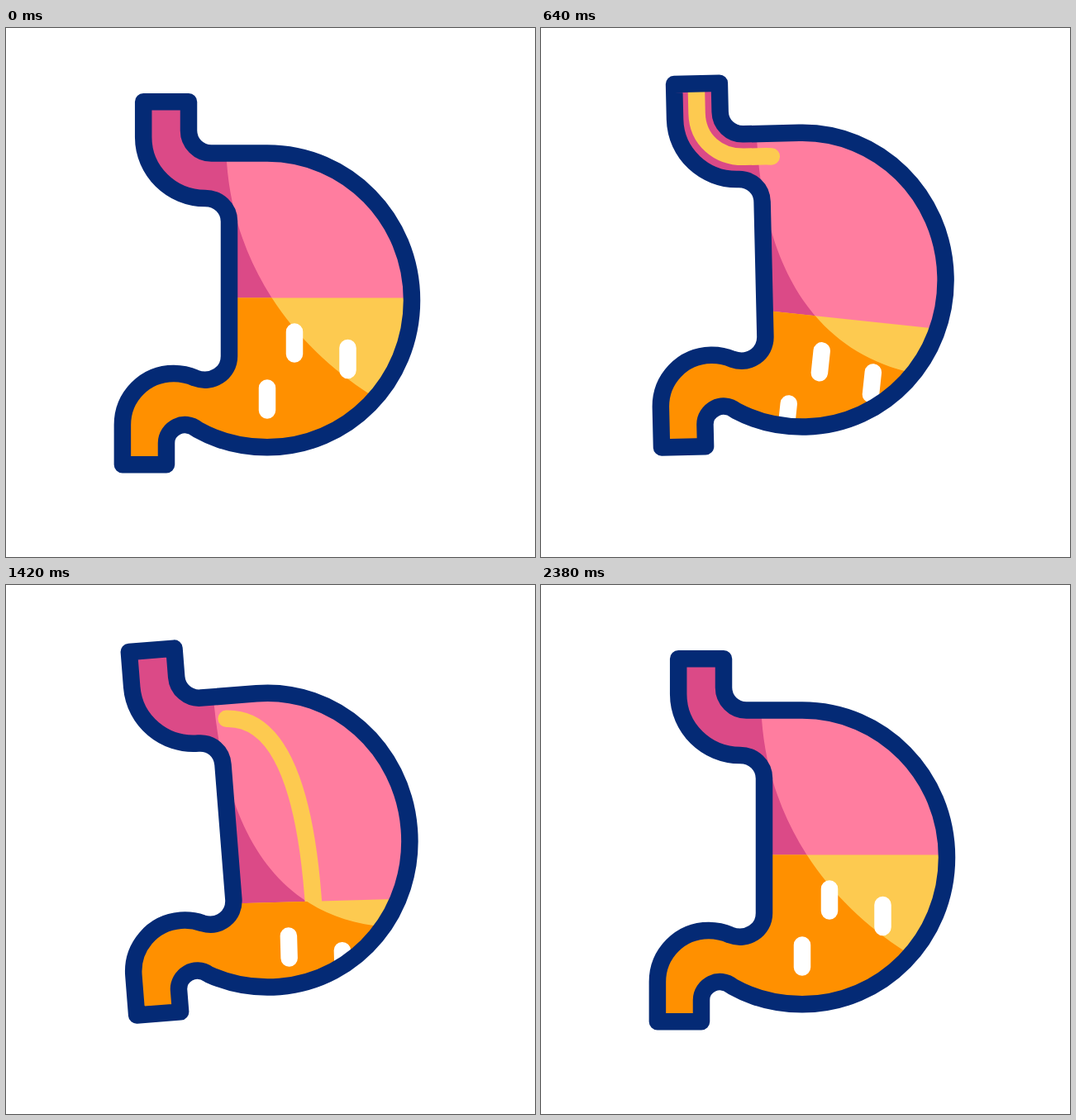
Animation of 640 by 640 pixels, one loop 2.4 s. Source, as an HTML page:

```html
<!DOCTYPE html>
<html lang="en">
<head>
<meta charset="utf-8">
<title>Stomach</title>
<style>
  html, body { margin: 0; width: 100%; height: 100%; overflow: hidden; background: #fff; }
  svg { display: block; width: 100vw; height: 100vh; }
  .outline { fill: none; stroke: #042a75; stroke-width: 20.5; stroke-linejoin: round; }
  .stream { fill: none; stroke: #fdca50; stroke-width: 20.5; stroke-linecap: round; }
  .pills { stroke: #fff; stroke-width: 20.5; stroke-linecap: round; }
</style>
</head>
<body>
<svg viewBox="0 0 640 640">
  <defs>
    <path id="body"/>
    <path id="shade"/>
    <clipPath id="inside"><use href="#body"/></clipPath>
    <clipPath id="below"><rect class="liquid" x="-500" width="1000" height="600"/></clipPath>
  </defs>
  <g id="stomach">
    <g clip-path="url(#inside)">
      <rect width="640" height="640" fill="#ff7d9f"/>
      <use href="#shade" fill="#db4a87"/>
      <path class="stream" d="M193.5 89V125C193.5 157 218 179 250 179H275C328 179 366 235 366 400V450"/>
      <g clip-path="url(#below)">
        <rect width="640" height="640" fill="#fdca50"/>
        <use href="#shade" fill="#ff9000"/>
      </g>
      <path class="liquid pills" d="M33 41v27M97.5 60.5v27M0 109v27"/>
    </g>
    <use href="#body" class="outline"/>
  </g>
</svg>
<script>
const LOOP = 2400, CX = 316, CY = 329.5;
const $ = s => document.querySelector(s);
const body = $('#body'), shade = $('#shade'), stomach = $('#stomach'), stream = $('.stream');
const liquid = document.querySelectorAll('.liquid');
const set = (el, attrs) => { for (const k in attrs) el.setAttribute(k, attrs[k]); };

const clamp = u => Math.min(1, Math.max(0, u));
const smooth = u => u * u * (3 - 2 * u);
const ramp = (t, from, to) => smooth(clamp((t - from) / (to - from)));

// Eases through evenly spaced poses, starting and ending at rest.
function swing(t, step, ...poses) {
  const i = Math.floor(t / step), a = poses[i - 1] || 0, b = poses[i] || 0;
  return a + (b - a) * smooth(t / step - i);
}

function bodyPath(push) {
  const wall = 270 + push, right = 491 + 3 * push, mid = 413 + 1.5 * push;
  return `M166.2 89.2H221V124A27.5 27.5 0 0 0 248.5 151.5H316
    C${mid} 151.5 ${right} 231 ${right} 329.5S${mid} 507.3 316 507.3
    C285 507.3 257 500 232 486C215 472 194 485 194 502V528.2H140.9V480
    C141 446 168 418 203 418C212 418 221 420 229 423.5
    C249 431 ${wall} 418 ${wall} 397V234C${wall} 218 257 206 241 206
    C200 206 166.2 173 166.2 132Z`;
}

function shadePath(sag, push) {
  const x = (at, shift) => at + shift * sag + push;
  return `M60 40H${x(266, -1)}L${x(267, -2)} 162
    C${x(276, -8)} ${290 + 10 * sag} ${x(350, -40)} ${385 + 30 * sag} ${x(440, -2)} 443
    L490 ${472 - 17 * sag}V640H60Z`;
}

function draw(t) {
  const dy = swing(t, 360, 53, -36, 57, -21.5, 16);
  const tilt = swing(t, 428, -17.8, 15.6, -7, 3.4);
  const slosh = swing(t, 430, 11, 3.5, 3.3, 1.5);
  const push = swing(t, 370, 5.7, -2, 3.3, -1.6, -1.6);
  const drain = ramp(t, 330, 920) - ramp(t, 1310, 2160);

  const lean = Math.sin(tilt * Math.PI / 180), dx = -20 * lean - 75 * lean * lean;
  set(stomach, { transform:
    `translate(${CX + dx} ${CY + dy}) rotate(${tilt}) translate(${-CX} ${-CY})` });
  set(body, { d: bodyPath(push) });
  set(shade, { d: shadePath(1 - (1 - drain) ** 2, push) });

  // The liquid drops straight down whatever the tilt, its surface trailing the body.
  const level = `translate(${CX} ${CY}) rotate(${-tilt}) ` +
    `translate(${push - 8.5 * drain} ${-3 + 82.5 * drain}) rotate(${tilt + slosh})`;
  liquid.forEach(el => set(el, { transform: level }));

  const head = .465 * (t - 305), tail = Math.max(0, .345 * (t - 980));
  set(stream, {
    transform: `translate(${push} 0)`,
    visibility: head > 0 && tail < 420 ? 'visible' : 'hidden',
    'stroke-dasharray': `${Math.max(head - tail, .1)} 2000`,
    'stroke-dashoffset': -tail
  });
}

let start;
function frame(now) {
  start ??= now;
  draw((now - start) % LOOP);
  requestAnimationFrame(frame);
}
draw(0);
requestAnimationFrame(frame);
</script>
</body>
</html>
```
